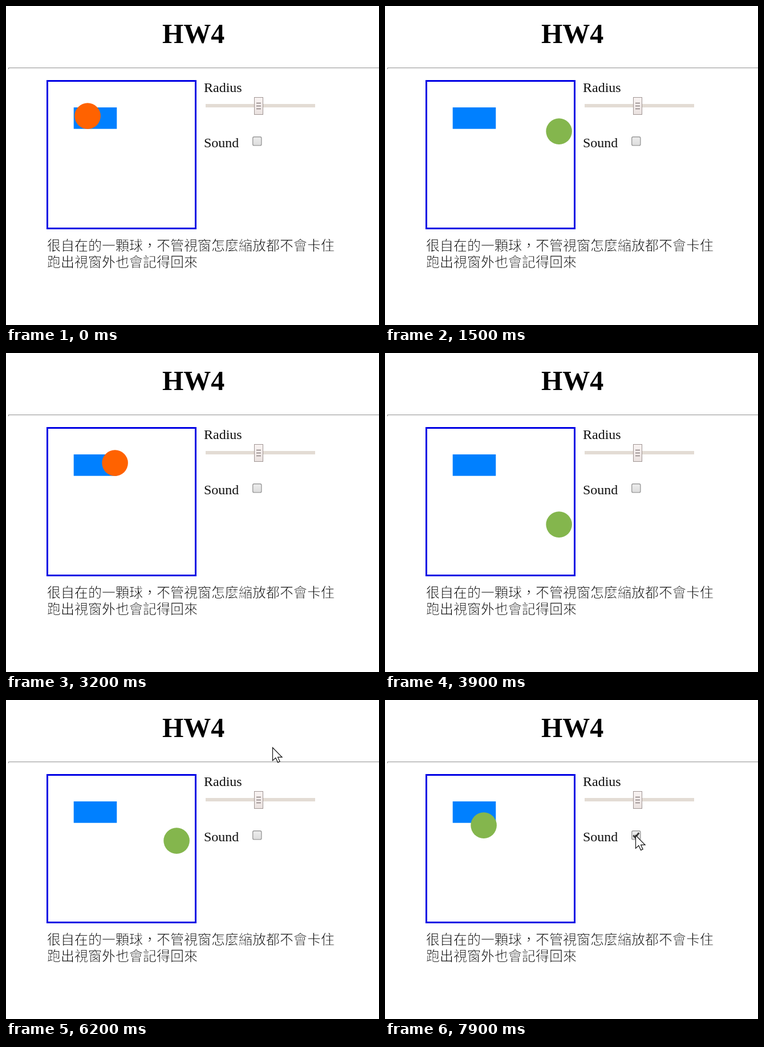
An HTML page for the animation above (8000 ms loop, 654 by 560 pixels).

```html
<!DOCTYPE html>
<html lang="zh-Hant">
<head>
<meta charset="utf-8">
<title>HW4</title>
<style>
  html, body { margin: 0; width: 100%; height: 100%; overflow: hidden; background: #fff; }
  svg { display: block; width: 654px; height: 560px; }
  text { font: 24px "Liberation Serif", "Times New Roman", serif; fill: #111; }
  .title { font-size: 48px; font-weight: bold; text-anchor: middle; fill: #000; }
  /* The white outline thins the strokes of the regular weight. */
  .note {
    font-family: "Noto Sans CJK TC", "Noto Sans CJK", sans-serif; font-weight: 200;
    fill: #000; stroke: #fff; stroke-width: .75px;
  }
</style>
</head>
<body>
<svg viewBox="0 0 654 560">
  <defs>
    <linearGradient id="thumb" x2="0" y2="1">
      <stop stop-color="#f9f4f3"/><stop offset="1" stop-color="#eae2e0"/>
    </linearGradient>
    <linearGradient id="box" x2="0" y2="1">
      <stop stop-color="#eee"/><stop offset="1" stop-color="#dcdcdc"/>
    </linearGradient>
  </defs>

  <text class="title" x="328.6" y="65">HW4</text>
  <path d="M4 108.5H654M4.5 108V111" stroke="#9a9a9a"/>
  <path d="M5 110H654" stroke="#eee"/>

  <text x="347" y="151">Radius</text>
  <rect x="350" y="172" width="192" height="6" fill="#e3dcd4"/>
  <rect x="435.5" y="160.5" width="15" height="30" fill="url(#thumb)" stroke="#a09593"/>
  <path d="M439 170.5h8M439 175.5h8M439 180.5h8" stroke="#8a8080" stroke-width="1.4"/>

  <text x="347" y="248">Sound</text>
  <rect x="432.7" y="229.7" width="15.2" height="15.2" rx="2.5" fill="url(#box)" stroke="#9b9b9b" stroke-width="1.4"/>
  <path id="tick" d="M435.3 237.6l3.4 3.6 6.6-8" fill="none" stroke="#3c3c3c" stroke-width="3"/>

  <rect x="72.5" y="131.5" width="260" height="259" fill="none" stroke="#0000e4" stroke-width="3"/>
  <rect x="118.7" y="178" width="75.6" height="37.7" fill="#0080ff"/>
  <circle id="ball" r="22.8"/>

  <text class="note" x="72" y="429">很自在的一顆球，不管視窗怎麼縮放都不會卡住</text>
  <text class="note" x="72" y="458">跑出視窗外也會記得回來</text>

  <path id="cursor" d="M.5.5V23.5L5.8 18.6 9.6 26.6 13.2 25 9.6 17.4H17Z" fill="#fff" stroke="#111" stroke-width="1.2"/>
</svg>
<script>
  const STEP = 100, LOOP = 8000, SPAN = 216;
  const SHOW = 61, CLICK = 77;
  const ball = document.getElementById('ball');
  const tick = document.getElementById('tick');
  const cursor = document.getElementById('cursor');
  const trail = [[467, 26], [467, 83], [464, 138], [456, 184], [446, 220], [439, 237]];

  // Reflect a running distance between two walls SPAN apart.
  function bounce(d) {
    const m = ((d % (2 * SPAN)) + 2 * SPAN) % (2 * SPAN);
    return Math.min(m, 2 * SPAN - m);
  }

  function touches(x, y) {
    const dx = x - Math.max(119, Math.min(194, x));
    const dy = y - Math.max(178, Math.min(216, y));
    return y < 216 && Math.hypot(dx, dy) < 23;
  }

  function show(el, on) {
    el.setAttribute('visibility', on ? 'visible' : 'hidden');
  }

  function draw(n) {
    const x = 95.1 + bounce(18 * n - 48);
    const y = 152.6 + bounce(27 * n - 40.5);
    ball.setAttribute('cx', x);
    ball.setAttribute('cy', y);
    ball.setAttribute('fill', touches(x, y) ? '#ff6200' : '#84b64d');

    const i = Math.max(0, Math.min(n - SHOW, trail.length - 1));
    cursor.setAttribute('transform', `translate(${trail[i]})`);
    show(cursor, n >= SHOW);
    show(tick, n >= CLICK);
  }

  const start = performance.now();
  function frame() {
    draw(Math.floor(((performance.now() - start) % LOOP) / STEP));
    requestAnimationFrame(frame);
  }
  frame();
</script>
</body>
</html>
```
